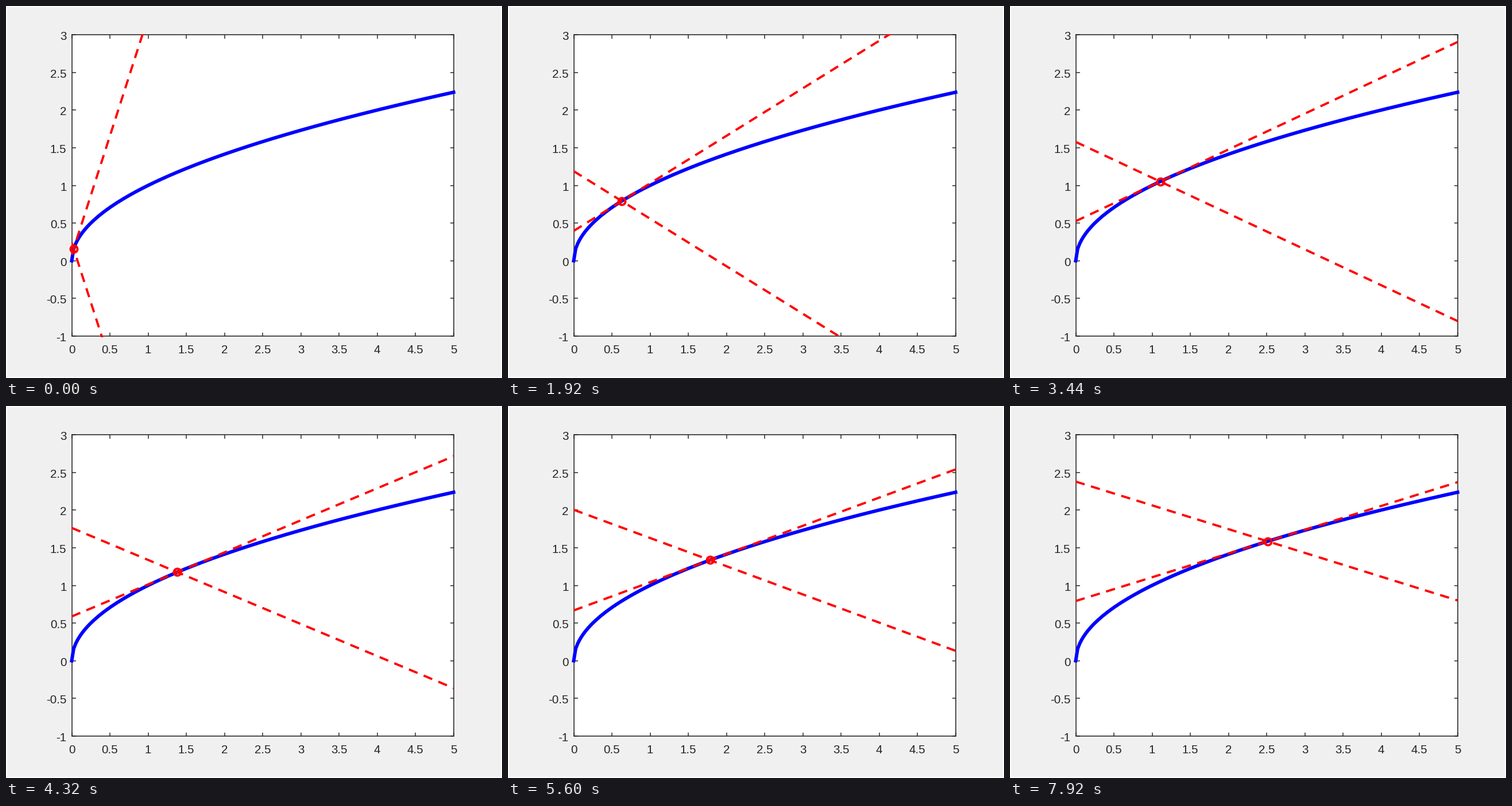
Recreate the animation shown at these times as a matplotlib script. Size 864 by 648 pixels, loop 8 s.

```python
import numpy as np
import matplotlib.pyplot as plt
from matplotlib.animation import FuncAnimation
from matplotlib.patches import Rectangle
from matplotlib.transforms import Bbox, TransformedBbox, IdentityTransform

WIDTH, HEIGHT = 864, 648
LEFT, RIGHT, TOP, BOTTOM = 114.5, 779.7, 50, 575
FRAMES, INTERVAL = 100, 80
INK, RED, BLUE = "#262626", "#ff0000", "#0000ff"

# At 72 dpi one point equals one pixel.
fig = plt.figure(figsize=(WIDTH / 72, HEIGHT / 72), dpi=72, facecolor="white")
fig.add_artist(Rectangle((2, 2), WIDTH - 4, HEIGHT - 4, facecolor="#f0f0f0",
                         edgecolor="none", transform=IdentityTransform(), zorder=-5))

ax = fig.add_axes([LEFT / WIDTH, 1 - BOTTOM / HEIGHT,
                   (RIGHT - LEFT) / WIDTH, (BOTTOM - TOP) / HEIGHT])
ax.set(xlim=(0, 5), ylim=(-1, 3),
       xticks=np.arange(0, 5.1, 0.5), yticks=np.arange(-1, 3.1, 0.5))
ax.tick_params(direction="in", length=6.5, width=1.5, color=INK, top=True,
               right=True, labelbottom=False, labelleft=False)
for spine in ax.spines.values():
    spine.set(linewidth=1.6, color=INK)


def label(x, y, value, align):
    fig.text(x / WIDTH, 1 - y / HEIGHT, f"{value:g}", ha=align, va="baseline",
             family="Liberation Sans", size=20.5, color=INK)


for value in ax.get_xticks():
    label(LEFT + value * (RIGHT - LEFT) / 5, 605, value, "center")
for value in ax.get_yticks():
    label(105.5, BOTTOM - (value + 1) * (BOTTOM - TOP) / 4 + 9, value, "right")

xs = np.linspace(0, 5, 200)
ax.plot(xs, np.sqrt(xs), color=BLUE, lw=6, clip_on=False, zorder=3)

# Dashes may reach just over the frame line.
clip = TransformedBbox(Bbox([[LEFT - 1, HEIGHT - BOTTOM - 1.5],
                             [RIGHT + 1.5, HEIGHT - TOP + 1.5]]), IdentityTransform())


def dashed_line():
    line, = ax.plot([], [], color=RED, lw=3.9, zorder=4,
                    linestyle=(0, (16.2 / 3.9, 11.5 / 3.9)))
    line.set_clip_box(clip)
    return line


tangent, mirrored = dashed_line(), dashed_line()
marker, = ax.plot([], [], "o", ms=12, mfc="none", mec=RED, mew=3.9,
                  clip_on=False, zorder=5)


def update(frame):
    x0 = xs[frame + 1]
    y0 = np.sqrt(x0)
    slope = 0.5 / y0
    ends = np.array([0, 5])
    tangent.set_data(ends, y0 + slope * (ends - x0))
    mirrored.set_data(ends, y0 - slope * (ends - x0))
    marker.set_data([x0], [y0])
    return tangent, mirrored, marker


anim = FuncAnimation(fig, update, frames=FRAMES, interval=INTERVAL,
                     repeat=True, repeat_delay=0)
plt.show()
```
